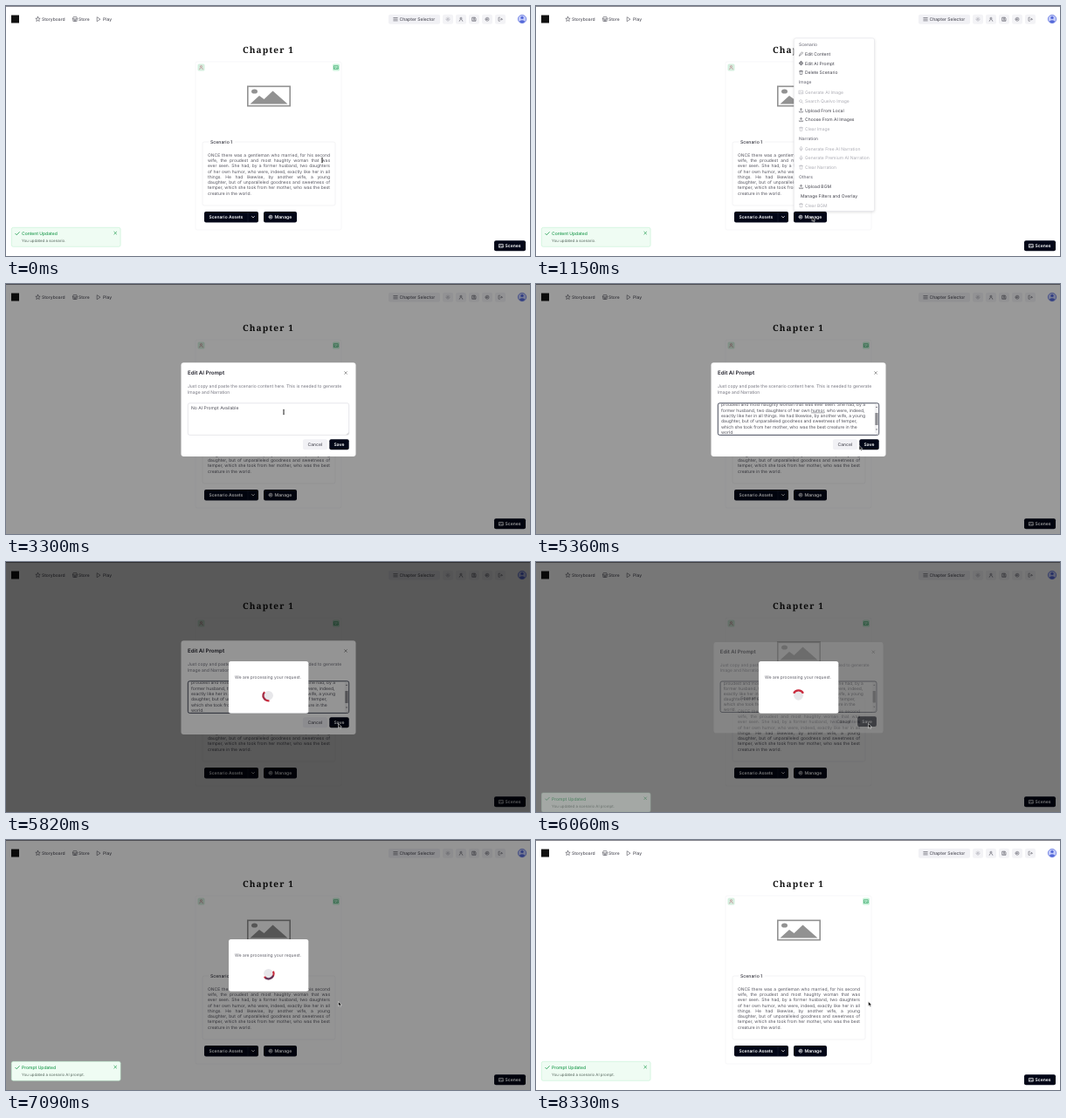
These frames come from a looping animation (600 px wide and 287 px high, 8.39 s). An HTML page:

```html
<!DOCTYPE html>
<html lang="en">
<head>
<meta charset="utf-8">
<title>Storyboard editor</title>
<style>
html, body { margin: 0; width: 100%; height: 100%; overflow: hidden; background: #fff; }
svg { display: block; width: 100vw; height: 100vh; }
text { font-family: Inter, "Noto Sans", sans-serif; text-rendering: geometricPrecision; white-space: pre; }
.icon { fill: none; stroke-linecap: round; stroke-linejoin: round; }
</style>
</head>
<body>
<svg id="stage" viewBox="0 0 600 287" preserveAspectRatio="none"></svg>
<script>
const LOOP = 8390;
const INK = '#020617', BODY = '#50505a', MUTED = '#74747f';
const stage = document.getElementById('stage');

// y is the middle of the text line
const label = (x, y, s, size = 5.03, fill = BODY, weight = 400, more = '') =>
  `<text x="${x}" y="${y + size * .36}" font-size="${size}" fill="${fill}" font-weight="${weight}" ${more}>${s}</text>`;
const box = (x, y, w, h, fill, r = 2, stroke = 'none', more = '') =>
  `<rect x="${x}" y="${y}" width="${w}" height="${h}" rx="${r}" fill="${fill}" stroke="${stroke}" stroke-width=".5" ${more}/>`;
const icon = (x, y, d, stroke = BODY, width = .6) =>
  `<path class="icon" transform="translate(${x} ${y})" d="${d}" stroke="${stroke}" stroke-width="${width}"/>`;
const group = (id, inner, more = '') => `<g id="${id}" ${more}>${inner}</g>`;

const SHAPE = {
  star: 'M0-2.7L.8-.8 2.7-.7 1.2.6 1.7 2.5 0 1.5-1.7 2.5-1.2.6-2.7-.7-.8-.8Z',
  store: 'M-2.2-.3V2.4H2.2V-.3M-2.6-.5L-1.9-2.4H1.9L2.6-.5ZM-.7 2.4V.8H.7V2.4',
  play: 'M-1.5-2.3L2 0-1.5 2.3Z',
  lines: 'M-2.2-1.7H2.2M-2.2 0H2.2M-2.2 1.7H2.2',
  sun: 'M-1 0A1 1 0 1 0 1 0A1 1 0 1 0-1 0M0-2.2V-1.8M0 2.2V1.8M-2.2 0H-1.8M2.2 0H1.8M-1.5-1.5L-1.3-1.3M1.5 1.5L1.3 1.3M-1.5 1.5L-1.3 1.3M1.5-1.5L1.3-1.3',
  user: 'M-1-1.1A1 1 0 1 0 1-1.1A1 1 0 1 0-1-1.1M-1.9 2.2A1.9 1.9 0 0 1 1.9 2.2',
  save: 'M-2-2H1.2L2-1.2V2H-2ZM-1-2V-.8H.8V-2M-1 2V.5H1V2',
  gear: 'M-2 0A2 2 0 1 0 2 0A2 2 0 1 0-2 0M-.7 0A.7 .7 0 1 0 .7 0A.7 .7 0 1 0-.7 0',
  exit: 'M-.6-2H-2V2H-.6M-.4 0H2.2M1.1-1.1L2.2 0 1.1 1.1',
  globe: 'M-2 0A2 2 0 1 0 2 0A2 2 0 1 0-2 0M-2 0H2M0-2Q-1.7 0 0 2Q1.7 0 0-2',
  pen: 'M-2 2L-1.5.4 1.1-2.1 2.1-1.1-.5 1.5Z',
  bin: 'M-2-1.4H2M-1.4-1.4L-1.2 2.2H1.2L1.4-1.4M-.7-1.4V-2.2H.7V-1.4',
  image: 'M-2.2-1.8H2.2V1.8H-2.2ZM-2.2 1.1L-.6-.3.6.8 1.3.2 2.2 1.1',
  search: 'M-1.9-.4A1.5 1.5 0 1 0 1.1-.4A1.5 1.5 0 1 0-1.9-.4M.8.8L2.1 2.1',
  upload: 'M-2 .9V2H2V.9M0 1V-2.2M-1.2-1L0-2.2 1.2-1',
  mic: 'M-.8-1.5A.8.8 0 0 1 .8-1.5V0A.8.8 0 0 1-.8 0ZM-1.7 0A1.7 1.7 0 0 0 1.7 0M0 1.7V2.4',
  check: 'M-2.2 0L-.8 1.5 2.3-1.7',
  cross: 'M-1.4-1.4L1.4 1.4M1.4-1.4L-1.4 1.4',
  down: 'M-1.5-.7L0 .8 1.5-.7'
};

const story = [
  'ONCE there was a gentleman who married, for his second',
  'wife, the proudest and most haughty woman that was',
  'ever seen. She had, by a former husband, two daughters',
  'of her own humor, who were, indeed, exactly like her in all',
  'things. He had likewise, by another wife, a young',
  'daughter, but of unparalleled goodness and sweetness of',
  'temper, which she took from her mother, who was the best',
  'creature in the world.'
];
const prompt = [
  'ONCE there was a gentleman who married, for his second wife, the',
  'proudest and most haughty woman that was ever seen. She had, by a',
  'former husband, two daughters of her own <tspan text-decoration="underline">humor</tspan>, who were, indeed,',
  'exactly like her in all things. He had likewise, by another wife, a young',
  'daughter, but of unparalleled goodness and sweetness of temper,',
  'which she took from her mother, who was the best creature in the',
  'world.'
];

// [y, text, icon, enabled]; no icon name means a heading
const menu = [
  [44, 'Scenario'], [55, 'Edit Content', 'pen', 1], [65.7, 'Edit AI Prompt', 'globe', 1], [76.3, 'Delete Scenario', 'bin', 1],
  [87.5, 'Image'], [99, 'Generate AI Image', 'image', 0], [109.5, 'Search Quelvo Image', 'search', 0],
  [120, 'Upload From Local', 'upload', 1], [130.6, 'Choose From AI Images', 'upload', 1], [141.2, 'Clear Image', 'bin', 0],
  [152.6, 'Narration'], [163.8, 'Generate Free AI Narration', 'mic', 0], [174.4, 'Generate Premium AI Narration', 'mic', 0], [185, 'Clear Narration', 'bin', 0],
  [196.4, 'Others'], [207.6, 'Upload BGM', 'upload', 1], [218.2, 'Manage Filters and Overlay', '', 1], [228.8, 'Clear BGM', 'bin', 0]
];

function header() {
  const tools = ['sun', 'user', 'save', 'gear', 'exit'];
  return box(0, 0, 600, 1, '#85858d', 0) +
    box(6, 10.5, 9, 9, '#111', 0) +
    icon(36.5, 15, SHAPE.star) + label(41, 15, 'Storyboard', 4.98, BODY, 500) +
    icon(79, 15, SHAPE.store) + label(83, 15, 'Store', 4.98, BODY, 500) +
    icon(106, 15.2, SHAPE.play) + label(111, 15, 'Play', 4.98, BODY, 500) +
    box(438, 9.7, 59, 11, '#f1f1f5') + icon(446, 15.2, SHAPE.lines) +
    label(450.5, 15.2, 'Chapter Selector', 5.05, BODY, 500) +
    tools.map((n, i) => box(500 + i * 15, 9.7, 12, 11, '#f3f3f6') + icon(506 + i * 15, 15.2, SHAPE[n], i ? '#62626d' : '#a3a3ad')).join('') +
    '<circle cx="591" cy="15" r="4.7" fill="#c5cdfa" stroke="#5468d8" stroke-width=".7"/>' +
    '<circle cx="591" cy="13.4" r="1.7" fill="#5468d8"/><path d="M587.8 18.1a3.3 2.6 0 0 1 6.4 0a4.7 4.7 0 0 1-6.4 0Z" fill="#5468d8"/>';
}

function card() {
  return `<text x="271" y="54.4" font-size="10" font-weight="700" letter-spacing="1.1" fill="#111" style="font-family:'Noto Serif',serif">Chapter 1</text>` +
    box(217, 64, 167, 193, '#fff', 2, '#ededf1') +
    box(219.5, 66.5, 8, 8, '#d5efdf', 1.5) + icon(223.5, 70.5, SHAPE.user, '#c0808a', .6) +
    box(374, 66.5, 8, 8, '#c9f3da', 1.5) + icon(378, 70.5, SHAPE.image, '#259a5b', .6) +
    '<rect x="276.8" y="92.3" width="48.4" height="22.4" fill="#fff" stroke="#929292" stroke-width="1.6"/>' +
    '<ellipse cx="284.5" cy="98" rx="3.5" ry="2.6" fill="#929292"/>' +
    '<path d="M279.5 112.5L290 103l5.5 4 10-9.5L322.5 112.5Z" fill="#929292"/>' +
    box(225, 156, 152, 73, 'none', 2, '#e6e6eb') + box(232, 154, 30, 5, '#fff', 0) +
    label(234, 156, 'Scenario 1', 5.15, '#33333d', 500) +
    story.map((s, i) => label(231, 171 + i * 6.27, s, 4.98, '#55555f', 400, 'class="story"')).join('') +
    box(227, 236, 62, 12.4, INK) + label(232.5, 242.3, 'Scenario Assets', 4.95, '#fff', 600) +
    '<path d="M277 236.5V248" stroke="#2a2f40" stroke-width=".4"/>' + icon(283, 242.2, SHAPE.down, '#fff', .7) +
    box(295, 236, 38, 12.4, INK) + icon(303, 242.2, SHAPE.gear, '#fff', .7) + label(307.5, 242.3, 'Manage', 5.05, '#fff', 600) +
    box(559, 269.3, 36, 12, INK) + icon(567, 275.3, SHAPE.image, '#fff', .7) + label(571.5, 275.4, 'Scenes', 5.05, '#fff', 600);
}

function menuBody() {
  return box(295.3, 37, 92.2, 198.5, '#fff', 2, '#dedee4', 'style="filter:drop-shadow(0 1px 1.5px #0002)"') +
    box(297, 0, 89, 10, '#efeff1', 1, 'none', 'id="hover"') +
    menu.map(([y, s, name, on], i) => {
      if (name === undefined) return label(301, y, s, 4.95, MUTED, 500);
      const tone = on ? '#3f3f49' : '#acacb4';
      return (name ? icon(303.5, y, SHAPE[name], tone, .5) : '') +
        label(name ? 308 : 303, y, s, 5.03, tone, 400, `id="item${i}"`);
    }).join('');
}

function dialogBody() {
  return box(200.5, 90.3, 200, 107.7, '#fff', 3) +
    label(208, 102, 'Edit AI Prompt', 6.15, '#1f1f29', 600) + icon(389, 102, SHAPE.cross, '#666', .6) +
    label(208, 117.4, 'Just copy and paste the scenario content here. This is needed to generate', 5.03, MUTED) +
    label(208, 123.8, 'Image and Narration', 5.03, MUTED) +
    box(208.3, 136.8, 184.4, 36.6, '#fff', 2, '#cfcfd6', 'id="field"') +
    box(212, 139.5, 55.5, 7, '#a9cdfb', 0, 'none', 'id="select"') +
    label(212, 142.6, 'No AI Prompt Available', 5.06, BODY, 400, 'id="empty"') +
    group('pasted',
      `<g clip-path="url(#fieldClip)">${group('lines', prompt.map((s, i) => label(212, 132.3 + i * 6.28, s, 5.03, BODY)).join(''))}</g>` +
      box(387.8, 138, 4.3, 35, '#f1f1f3', 0) + box(388.3, 148, 3.3, 14, '#8f8f94', .5) +
      '<path d="M388.8 142l1.2-1.6 1.2 1.6ZM388.8 166.5l1.2 1.6 1.2-1.6Z" fill="#77777d"/>') +
    icon(391, 171.8, 'M-1 1L1-1M0 1L1 0', '#888', .3) +
    box(340, 178.3, 28, 12, '#f1f1f5') + label(345.6, 184.4, 'Cancel', 5, BODY, 500) +
    box(370.3, 178.3, 22.4, 12, INK) + label(375.6, 184.4, 'Save', 5, '#fff', 600);
}

const loader = box(255, 114, 91.3, 59.8, '#fff', 2.5) +
  label(262, 132.6, 'We are processing your request.', 4.97, '#62626c') +
  '<circle cx="300.5" cy="153.3" r="5.4" fill="#e7e7ea"/>' +
  '<g id="spin"><path id="red" fill="none" stroke="#c92a3c" stroke-width="2.2"/><path id="navy" fill="none" stroke="#273a68" stroke-width="2.2"/></g>';

const toast = box(6.3, 254.3, 124.8, 22, '#effcf3', 2, '#b5ecc8') +
  icon(13, 261.3, SHAPE.check, '#1d9a4d', .8) + icon(125.2, 260.6, SHAPE.cross, '#1d9a4d', .7) +
  label(18, 261.3, '', 5, '#1d9a4d', 500, 'id="toastHead"') +
  label(18, 269.7, '', 4.42, '#53635a', 400, 'id="toastText"');

stage.innerHTML =
  '<defs><clipPath id="fieldClip"><rect x="208.5" y="137.4" width="184" height="35.6"/></clipPath></defs>' +
  group('back',
    box(-5, -5, 610, 297, '#fff', 0) + header() + card() + group('menu', menuBody()) +
    box(-5, -5, 610, 297, '#000', 0, 'none', 'id="shade"') + group('dialog', dialogBody())) +
  box(0, 0, 600, 287, '#000', 0, 'none', 'id="veil"') + group('loader', loader) + group('toast', toast) +
  group('cursor',
    '<path id="arrow" d="M0 0V5.2L1.3 4.1 2.2 6 3.1 5.6 2.3 3.8 3.9 3.7Z" fill="#111" stroke="#fff" stroke-width=".5"/>' +
    '<path id="beam" d="M-1-2.8Q0-2.8 0-2V2Q0 2.8-1 2.8M1-2.8Q0-2.8 0-2V2Q0 2.8 1 2.8" fill="none" stroke="#222" stroke-width=".6"/>');

const el = {};
stage.querySelectorAll('[id]').forEach(n => el[n.id] = n);

function justify() {
  document.querySelectorAll('.story').forEach((n, i) => {
    if (i === story.length - 1) return;
    n.style.wordSpacing = '0px';
    const gaps = story[i].split(' ').length - 1;
    n.style.wordSpacing = (140 - n.getComputedTextLength()) / gaps + 'px';
  });
}
justify();

const ramp = (t, a, b) => Math.max(0, Math.min(1, (t - a) / (b - a)));
const ease = k => k * k * (3 - 2 * k);
const fade = (t, a, b, c, d) => ease(ramp(t, a, b)) * (1 - ease(ramp(t, c, d)));
const show = (n, k) => { n.style.opacity = k; n.style.display = k > 0 ? '' : 'none'; };
const zoom = (n, x, y, s) => n.setAttribute('transform', `translate(${x} ${y}) scale(${s}) translate(${-x} ${-y})`);

const route = [
  [0, 362, 177], [850, 316, 242], [1250, 316, 242], [2200, 337.5, 67], [3000, 337.5, 67],
  [3290, 318, 147], [4970, 318, 147], [5330, 370, 185.5], [5480, 370.5, 185.5], [5650, 380.5, 185.5], [LOOP, 380.5, 185.5]
];
function pointer(t) {
  const i = Math.max(1, route.findIndex(p => p[0] > t));
  const [a, ax, ay] = route[i - 1], [b, bx, by] = route[i];
  const k = ease(ramp(t, a, b));
  return [ax + (bx - ax) * k, ay + (by - ay) * k];
}

function arc(r, from, to) {
  const at = d => [300.5 + r * Math.cos(d * Math.PI / 180), 153.3 + r * Math.sin(d * Math.PI / 180)].join(' ');
  return `M${at(from)}A${r} ${r} 0 ${to - from > 180 ? 1 : 0} 1 ${at(to)}`;
}

function draw(t) {
  const [x, y] = pointer(t);
  const inStory = t < 900 && y < 219;
  const inField = t > 2850 && t < 5600 && y > 137 && y < 174;
  el.cursor.setAttribute('transform', `translate(${x} ${y})`);
  el.beam.style.display = inStory || inField ? '' : 'none';
  el.arrow.style.display = inStory || inField ? 'none' : '';

  const menuOn = fade(t, 1000, 1130, 2540, 2640);
  show(el.menu, menuOn);
  zoom(el.menu, 314, 236, .95 + .05 * menuOn);
  const hit = menu.findIndex(m => m[3] && x > 296 && Math.abs(y + 1 - m[0]) < 5.3);
  el.hover.style.display = hit < 0 ? 'none' : '';
  if (hit >= 0) el.hover.setAttribute('y', menu[hit][0] - 5);
  el.item2.setAttribute('fill', hit === 2 ? '#8d8d96' : '#3f3f49');

  const dialogOn = fade(t, 2550, 2800, 5950, 6170);
  show(el.dialog, dialogOn);
  show(el.shade, .4 * dialogOn);
  zoom(el.dialog, 300.5, 144, .94 + .06 * dialogOn);
  const focused = t >= 3540;
  el.field.setAttribute('stroke', focused ? '#33384a' : '#cfcfd6');
  el.field.setAttribute('stroke-width', focused ? .9 : .5);
  show(el.select, t >= 4000 && t < 4150 ? 1 : 0);
  show(el.empty, t < 4150 ? 1 : 0);
  show(el.pasted, t >= 4300 ? 1 : 0);
  el.lines.setAttribute('transform', `translate(0 ${10.3 * (1 - ease(ramp(t, 4300, 4500)))})`);

  const busy = fade(t, 5560, 5760, 7200, 7430);
  show(el.veil, .42 * busy);
  show(el.loader, busy);
  zoom(el.loader, 300.5, 144, .95 + .05 * busy);
  el.back.style.filter = busy > 0 ? `blur(${.55 * busy}px)` : 'none';
  const swing = .5 - .5 * Math.cos((t - 6060) / 1460 * 2 * Math.PI);
  const half = 65 + 28 * swing;
  el.red.setAttribute('d', arc(6, 270 - half, 270 + half));
  el.navy.setAttribute('d', arc(6, 235, 270 + half * .8));
  el.navy.style.opacity = swing;
  el.spin.setAttribute('transform', `rotate(${(t - 6060) / 730 * 360} 300.5 153.3)`);

  const first = t < 3000;
  const toastOn = first ? 1 - ease(ramp(t, 1250, 1450)) : ease(ramp(t, 5970, 6190));
  show(el.toast, toastOn);
  el.toast.setAttribute('transform', `translate(0 ${first ? 0 : 17 * (1 - toastOn)})`);
  el.toastHead.textContent = first ? 'Content Updated' : 'Prompt Updated';
  el.toastText.textContent = first ? 'You updated a scenario.' : 'You updated a scenario AI prompt.';
}

const start = performance.now();
function tick() {
  draw((performance.now() - start) % LOOP);
  requestAnimationFrame(tick);
}
draw(0);
requestAnimationFrame(tick);
</script>
</body>
</html>
```
